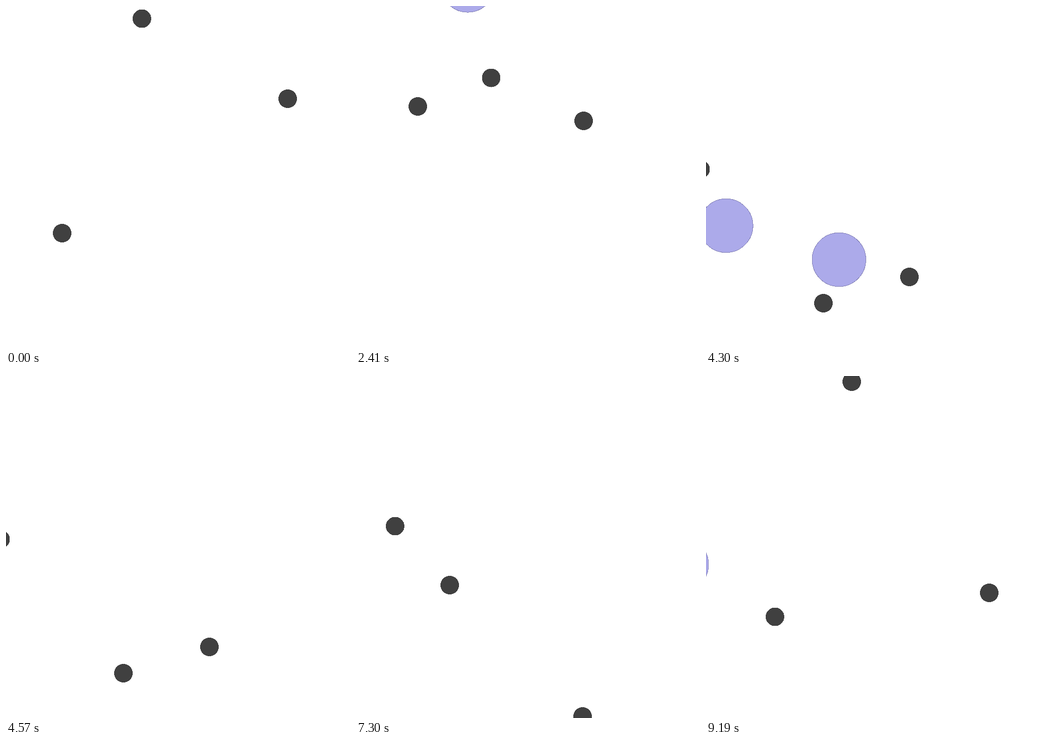
Write an HTML page that moves like this. It is 668x664 px and loops after 9260 ms.

```html
<!DOCTYPE html>
<html lang="en">
<head>
<meta charset="utf-8">
<title>Drifting circles</title>
<style>
  html, body { margin: 0; width: 100%; height: 100%; overflow: hidden; background: #fff; }
  svg { display: block; width: 100%; height: 100%; }
  circle { shape-rendering: crispEdges; }
  .ball { fill: #acaaea; stroke: #8583b8; stroke-width: 1; }
  .dot { fill: #404040; }
</style>
</head>
<body>
<svg viewBox="0 0 668 664">
  <g id="balls"></g>
  <g id="dots"></g>
</svg>
<script>
const LOOP = 9260, STEP = 70;

// Dots rest at [x, y]; balls start at [x, y, speed = 1] and follow the scene's drift.
const scenes = [
  { start: 0, end: 480, drift: [-3.6, 24.3],
    dots: [[264, 24.5], [547, 180], [109, 441]],
    balls: [[721, 549]] },
  { start: 1560, end: 2480, drift: [-14, -16],
    dots: [[120, 195], [262.5, 139.5], [442, 223]],
    balls: [[385, 152], [543, 76]] },
  { start: 4020, end: 4570, drift: [-18, 73],
    dots: [[-10.5, 317], [395, 526], [228, 577]],
    balls: [[111, 134.5], [330.3, 200.5], [615.7, 578]] },
  { start: 6440, end: 7300, drift: [46, -43],
    dots: [[76, 291.5], [182, 406], [440, 661]],
    balls: [[184.5, 457.5], [101.7, 76.5, 0.27], [-49.2, 388, -0.2]] },
  { start: 8770, end: LOOP, drift: [-26.2, -26.5],
    dots: [[283, 11], [550, 421], [134, 467.5]],
    balls: [[110, 525], [280, -8], [445, 315, -2]] }
];

function makeCircles(id, className, r) {
  const group = document.getElementById(id);
  return [0, 1, 2].map(() => {
    const c = document.createElementNS(group.namespaceURI, 'circle');
    c.setAttribute('class', className);
    c.setAttribute('r', r);
    return group.appendChild(c);
  });
}

const balls = makeCircles('balls', 'ball', 52.2);
const dots = makeCircles('dots', 'dot', 18);

function place(circle, x, y) {
  circle.setAttribute('cx', x);
  circle.setAttribute('cy', y);
}

function render(t) {
  const scene = scenes.filter(s => s.start <= t).pop();
  const k = Math.floor((t - scene.start) / STEP + 0.02);
  const [dx, dy] = scene.drift;
  dots.forEach((c, i) => place(c, ...scene.dots[i]));
  balls.forEach((c, i) => {
    const ball = scene.balls[i];
    const shown = ball && t < scene.end;
    c.setAttribute('visibility', shown ? 'visible' : 'hidden');
    if (!shown) return;
    const [x, y, speed = 1] = ball;
    place(c, x + dx * speed * k, y + dy * speed * k);
  });
}

const began = performance.now();

function tick() {
  render((performance.now() - began) % LOOP);
  requestAnimationFrame(tick);
}

tick();
</script>
</body>
</html>
```
